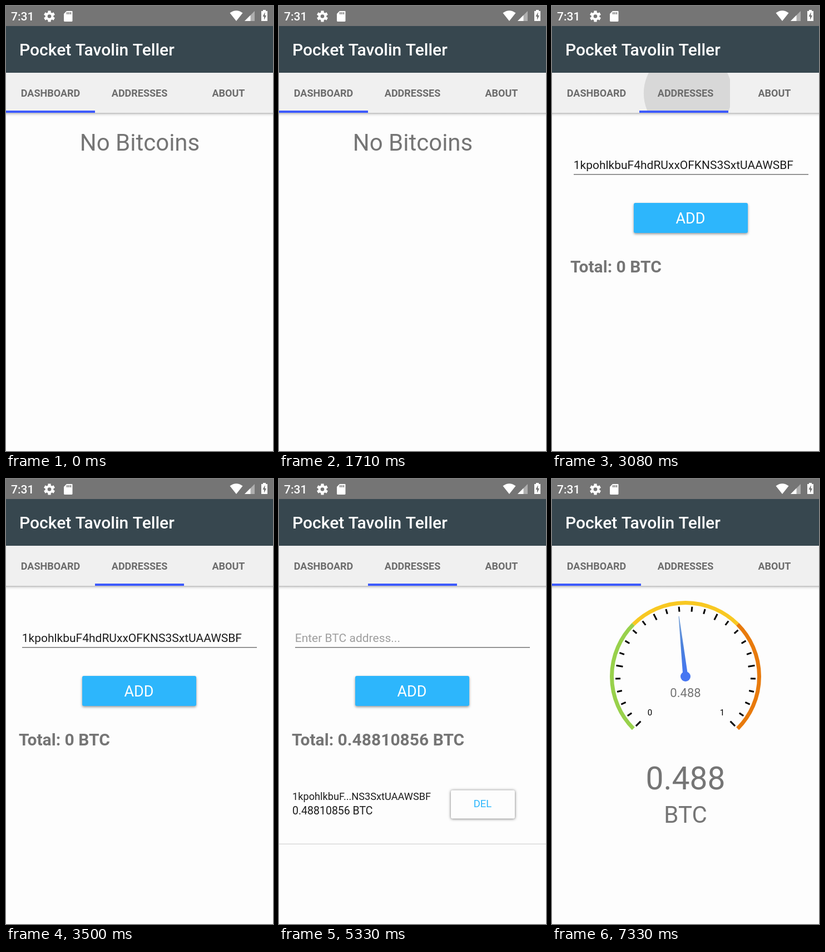
Recreate the animation shown at these times as an HTML page with a canvas. Size 480 px wide and 800 px high, loop 8000 ms.

```html
<!DOCTYPE html>
<html lang="en">
<head>
<meta charset="utf-8">
<title>Wallet demo</title>
<style>
  html, body { margin: 0; width: 100%; height: 100%; overflow: hidden; background: #fdfdfd; }
  canvas { display: block; width: 480px; height: 800px; }
</style>
</head>
<body>
<canvas id="stage" width="480" height="800"></canvas>
<script>
const ctx = document.getElementById('stage').getContext('2d');
const LOOP = 8000, W = 480, TAB_W = 160;
const BG = '#fdfdfd', BAR = '#37474f', STATUS = '#757575', TABS = '#f0f0f0';
const WHITE = '#fff', GREY = '#757575', INK = '#1c1c1c', BLUE = '#3d5afe';
const ADDRESS = '1kpohlkbuF4hdRUxxOFKNS3SxtUAAWSBF';
const SHORT = ADDRESS.slice(0, 10) + '...' + ADDRESS.slice(-13);

// Page changes; "steps" are the moments at which the screen refreshed.
const TO_ADDRESSES = {
  start: 2972, touch: [261, 160], tab: 1,
  steps: [3000, 3040, 3080, 3120, 3170, 3210, 3260, 3330]
};
const TO_DASHBOARD = {
  start: 6863, touch: [102, 167], tab: 0,
  steps: [6870, 6950, 7000, 7050, 7100, 7150, 7200, 7260, 7330]
};
const PRESS = 4700, ADDED = 4790, BALANCE = 5330;

const clamp = v => Math.max(0, Math.min(1, v));
const mix = (a, b, p) => a + (b - a) * p;
const rad = deg => deg * Math.PI / 180;

function rect(x, y, w, h, color) {
  ctx.fillStyle = color;
  ctx.fillRect(x, y, w, h);
}

function text(str, x, y, size, color, { weight = 400, align = 'left' } = {}) {
  ctx.font = `${weight} ${size}px Roboto, sans-serif`;
  ctx.textAlign = align;
  ctx.fillStyle = color;
  ctx.fillText(str, x, y);
}

function poly(points, color) {
  ctx.beginPath();
  points.forEach(([x, y]) => ctx.lineTo(x, y));
  ctx.closePath();
  ctx.fillStyle = color;
  ctx.fill();
}

function disc(x, y, r, color) {
  ctx.beginPath();
  ctx.arc(x, y, r, 0, Math.PI * 2);
  ctx.fillStyle = color;
  ctx.fill();
}

function card(x, y, w, h, color, shadow, blur, drop) {
  ctx.save();
  ctx.shadowColor = shadow;
  ctx.shadowBlur = blur;
  ctx.shadowOffsetY = drop;
  ctx.beginPath();
  ctx.roundRect(x, y, w, h, 3);
  ctx.fillStyle = color;
  ctx.fill();
  ctx.restore();
}

// Time since the tap as of the last refresh, or -1 before the first one.
function elapsed(move, t) {
  const shown = move.steps.filter(s => s <= t).pop();
  return shown === undefined ? -1 : shown - move.start;
}

function slide(move, t) {
  const e = elapsed(move, t);
  return e < 0 ? 0 : 1 - Math.pow(1 - clamp(e / 200), 5);
}

function drawGear(x, y) {
  ctx.save();
  ctx.translate(x, y);
  for (let i = 0; i < 6; i++) {
    rect(-2.6, -10, 5.2, 5, WHITE);
    ctx.rotate(Math.PI / 3);
  }
  disc(0, 0, 7.4, WHITE);
  disc(0, 0, 3.3, STATUS);
  ctx.restore();
}

function drawStatus() {
  rect(0, 0, W, 36, STATUS);
  text('7:31', 9, 26, 21, WHITE, { weight: 500 });
  drawGear(78, 18.5);

  poly([[109, 9], [119, 9], [119.5, 10], [119.5, 27], [118.5, 28], [105, 28], [104, 27], [104, 14]], WHITE);
  for (let i = 0; i < 3; i++) rect(109 + i * 3.2, 11, 1.7, 4, STATUS);

  ctx.beginPath();
  ctx.moveTo(414, 27);
  ctx.lineTo(402.5, 12.5);
  ctx.quadraticCurveTo(414, 4, 425.5, 12.5);
  ctx.closePath();
  ctx.fillStyle = WHITE;
  ctx.fill();

  poly([[447, 9], [447, 27], [429, 27]], '#aeaeae');
  poly([[439.5, 16.5], [439.5, 27], [429, 27]], WHITE);

  rect(462, 7, 5, 3, WHITE);
  rect(459, 9, 11, 18, WHITE);
  poly([[465.5, 11], [461.5, 19], [464, 19], [464, 25], [468, 17], [465.5, 17]], STATUS);
}

function drawRipple(move, t) {
  const e = elapsed(move, t);
  const alpha = 0.1 * clamp((e + 20) / 80) * clamp((350 - e) / 150);
  if (e < 0 || alpha === 0) return;
  const p = 1 - Math.pow(1 - clamp(e / 200), 2);
  const left = move.tab * TAB_W;
  ctx.save();
  ctx.beginPath();
  ctx.rect(left, 120, TAB_W, 72);
  ctx.clip();
  disc(mix(move.touch[0], left + 80, p), mix(move.touch[1], 156, p),
    mix(44.5, 89, p), `rgba(0,0,0,${alpha})`);
  ctx.restore();
}

function drawTabs(t, page) {
  const fade = ctx.createLinearGradient(0, 192, 0, 199);
  fade.addColorStop(0, 'rgba(0,0,0,.24)');
  fade.addColorStop(0.3, 'rgba(0,0,0,.17)');
  fade.addColorStop(0.45, 'rgba(0,0,0,.07)');
  fade.addColorStop(1, 'rgba(0,0,0,0)');
  rect(0, 192, W, 7, fade);
  rect(0, 120, W, 72, TABS);
  drawRipple(TO_ADDRESSES, t);
  drawRipple(TO_DASHBOARD, t);
  ['DASHBOARD', 'ADDRESSES', 'ABOUT'].forEach((label, i) =>
    text(label, 80 + i * TAB_W, 163, 18, '#6c6c6c', { weight: 700, align: 'center' }));
  rect(Math.round(page * TAB_W), 188, TAB_W, 4, BLUE);
}

function drawGauge() {
  const cx = 240, cy = 355;
  ctx.save();
  ctx.translate(cx, cy);

  ctx.lineWidth = 7;
  ['#98d14b', '#f8c822', '#e87a0c'].forEach((color, i) => {
    ctx.beginPath();
    ctx.arc(0, 0, 132.5, rad(135 + i * 90), rad(225 + i * 90));
    ctx.strokeStyle = color;
    ctx.stroke();
  });

  ctx.lineWidth = 3;
  ctx.strokeStyle = '#000';
  for (let i = 0; i <= 25; i++) {
    const a = rad(135 + i * 10.8), inner = i % 5 ? 117 : 114;
    ctx.beginPath();
    ctx.moveTo(Math.cos(a) * inner, Math.sin(a) * inner);
    ctx.lineTo(Math.cos(a) * 126, Math.sin(a) * 126);
    ctx.stroke();
  }

  ctx.save();
  ctx.rotate(rad(263.7));
  const tint = ctx.createLinearGradient(0, 0, 109, 0);
  tint.addColorStop(0, '#4676f2');
  tint.addColorStop(0.5, '#4a80dc');
  tint.addColorStop(1, '#7ba5d8');
  poly([[0, -4.5], [109, -0.5], [109, 0.5], [0, 4.5]], tint);
  ctx.restore();
  disc(0, 0, 9, '#4676f2');
  ctx.restore();

  const center = { align: 'center' };
  text('0', 176, 425, 15, '#000', center);
  text('1', 306, 425, 15, '#000', center);
  text('0.488', 240, 392, 22, GREY, center);
  text('0.488', 240, 558, 57, GREY, center);
  text('BTC', 240, 618, 42, GREY, center);
}

function drawDashboard(t) {
  if (t < BALANCE) text('No Bitcoins', 240.5, 260, 42, GREY, { align: 'center' });
  else drawGauge();
}

function drawAddresses(t) {
  const added = t >= ADDED;
  const pressed = t >= PRESS && !added;
  const amount = (t >= BALANCE ? '0.48810856' : '0') + ' BTC';

  if (added) text('Enter BTC address...', 28.7, 293, 21, '#9e9e9e');
  else text(ADDRESS, 28.7, 293, 21, INK);
  rect(29, 302, 422, 1.5, '#757575');

  card(137, 354, 205, 54, pressed ? '#29a1dd' : '#2db6fc', 'rgba(0,0,0,.4)', 4, 2);
  text('ADD', 239, 391, 27, WHITE, { align: 'center' });
  text('Total: ' + amount, 23, 479, 30, GREY, { weight: 700 });

  if (!added) return;
  text(SHORT, 24, 577, 18.2, INK);
  text(amount, 24, 603, 19.5, INK);
  card(309, 559.5, 115, 51, BG, 'rgba(0,0,0,.6)', 5, 0.5);
  text('DEL', 366, 590, 18.5, '#2db6fc', { align: 'center' });
  rect(0, 655.5, W, 1.5, '#dadada');
}

function draw(t) {
  const page = slide(TO_ADDRESSES, t) - slide(TO_DASHBOARD, t);
  const shift = Math.round(page * W);
  rect(0, 0, W, 800, BG);

  [drawDashboard, drawAddresses].forEach((drawPage, i) => {
    const x = i * W - shift;
    if (Math.abs(x) >= W) return;
    ctx.save();
    ctx.translate(x, 0);
    drawPage(t);
    ctx.restore();
  });

  drawTabs(t, page);
  rect(0, 36, W, 84, BAR);
  text('Pocket Tavolin Teller', 24, 89, 30, WHITE, { weight: 500 });
  drawStatus();
}

const begin = performance.now();
function tick() {
  draw((performance.now() - begin) % LOOP);
  requestAnimationFrame(tick);
}
tick();
</script>
</body>
</html>
```
